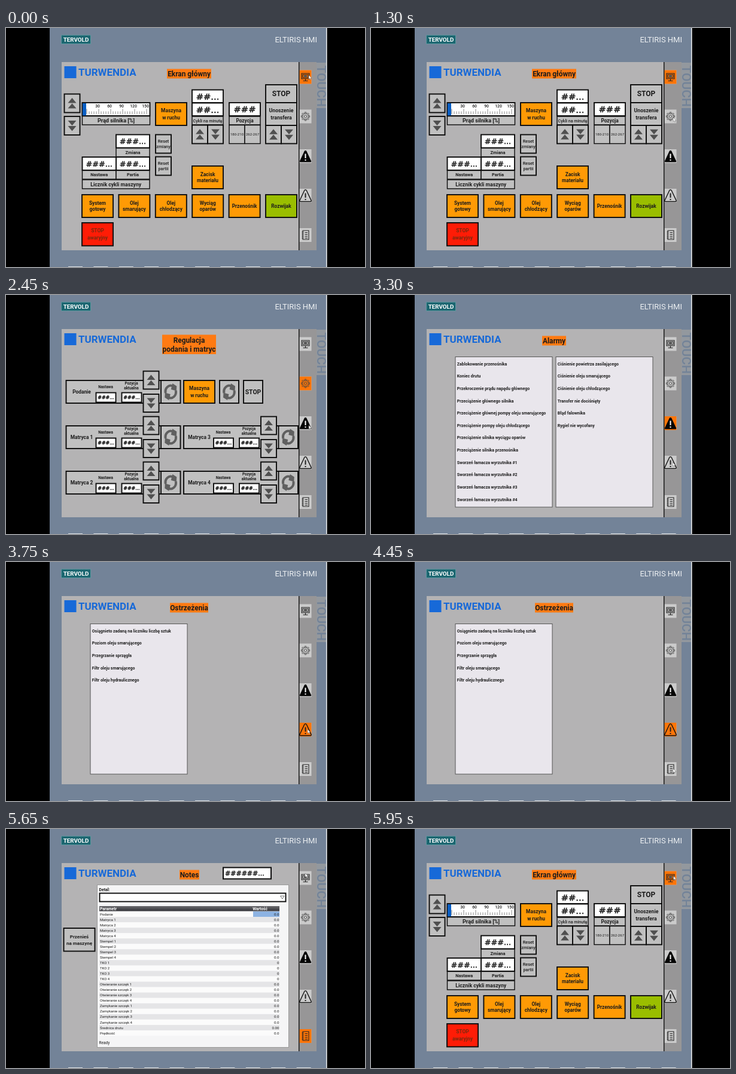
An HTML page that plays this animation: 600x400 px, repeating every 6000 ms.

```html
<!DOCTYPE html>
<html lang="pl">
<head>
<meta charset="utf-8">
<title>Panel operatorski</title>
<style>
  html, body { margin: 0; width: 100%; height: 100%; overflow: hidden; background: #000; }
  svg { display: block; width: 600px; height: 400px; }
  text { font-family: Roboto, "Noto Sans", sans-serif; }
  .hash { font-family: "DejaVu Sans", sans-serif; stroke: #1c1c1c; stroke-width: .5px; }
  .screen { visibility: hidden; animation: 6s step-end infinite; }
  #main { animation-name: main; }
  #feed { animation-name: feed; }
  #alarms { animation-name: alarms; }
  #warnings { animation-name: warnings; }
  #notes { animation-name: notes; }
  #cursor { animation: travel 6s ease-in-out infinite; }
  @keyframes main { 0% { visibility: visible } 25% { visibility: hidden } 95%, 100% { visibility: visible } }
  @keyframes feed { 0% { visibility: hidden } 25% { visibility: visible } 41.66%, 100% { visibility: hidden } }
  @keyframes alarms { 0% { visibility: hidden } 41.66% { visibility: visible } 61.66%, 100% { visibility: hidden } }
  @keyframes warnings { 0% { visibility: hidden } 61.66% { visibility: visible } 75%, 100% { visibility: hidden } }
  @keyframes notes { 0% { visibility: hidden } 75% { visibility: visible } 95%, 100% { visibility: hidden } }
  @keyframes travel {
    0%, 100% { transform: translate(506px, 79px) }
    21%, 25% { transform: translate(505px, 150px) }
    41%, 47.5% { transform: translate(506px, 218px) }
    55%, 65% { transform: translate(504px, 280px) }
    74%, 81.7% { transform: translate(505px, 346px) }
    92%, 96% { transform: translate(500px, 74px) }
  }
</style>
</head>
<body>
<svg id="stage" viewBox="0 0 600 400"></svg>
<script>
const ORANGE = '#ff9a05', TITLE = '#ff7a12', GREY = '#c0c0c0', PANEL = '#b4b3b4', INK = '#1c1c1c', EDGE = '#0c0c0c';

const rect = (x, y, w, h, fill, stroke = 'none', sw = 1.9) =>
  `<rect x="${x}" y="${y}" width="${w}" height="${h}" fill="${fill}" stroke="${stroke}" stroke-width="${sw}"/>`;
const path = (d, attrs) => `<path d="${d}" ${attrs}/>`;
const text = (s, x, y, size, { weight = 700, anchor = 'middle', fill = INK, extra = '' } = {}) =>
  `<text x="${x}" y="${y}" font-size="${size}" font-weight="${weight}" text-anchor="${anchor}" fill="${fill}" ${extra}>${s}</text>`;
const left = (s, x, y, size, weight = 600) => text(s, x, y, size, { weight, anchor: 'start' });
const hashes = (s, x, y, size) => text(s, x, y, size, { weight: 400, extra: 'class="hash"' });

// Lines of text centred on a point
const lines = (s, x, y, size, gap, opts) => {
  const rows = s.split('/');
  return rows.map((row, i) =>
    text(row, x, y + size * .35 + (i - (rows.length - 1) / 2) * gap, size, opts)).join('');
};
const button = (x, y, w, h, label, fill = GREY, size = 8.3, gap = 10.5) =>
  rect(x, y, w, h, fill, EDGE) + lines(label, x + w / 2, y + h / 2, size, gap);
const cell = (x, y, w, h, s, size) =>
  rect(x, y, w, h, '#fff', EDGE) + hashes(s, x + w / 2, y + h / 2 + size * .37, size);
const label = (x, y, w, h, s, size, weight = 600) =>
  rect(x, y, w, h, GREY, EDGE, 1.4) + text(s, x + w / 2, y + h / 2 + size * .36, size, { weight });
const title = (x, w, s) => rect(x, 68.5, w, 16, TITLE) + text(s, x + w / 2, 80.7, 11.9);

const arrows = (x, y, w, h, down) => {
  const tri = 'M0 -9 L7 -.6 H-7 Z M0 .2 L7 8.6 H-7 Z';
  return rect(x, y, w, h, GREY, EDGE) +
    path(tri, `fill="#505050" transform="translate(${x + w / 2} ${y + h / 2}) scale(1 ${down ? -1 : 1})"`);
};
const arrowPair = (x, y, w, h) => arrows(x, y, w, h) + arrows(x + w, y, w, h, true);
const refresh = (x, y, w, h) => {
  const half = path('M-8.5 2 A8.5 10 0 0 1 4 -9', 'fill="none" stroke="#606060" stroke-width="4"') +
    path('M3 -14 L10 -9.5 L9.5 -1.5 L.5 -4 Z', 'fill="#606060"');
  return rect(x, y, w, h, GREY, EDGE) +
    `<g transform="translate(${x + w / 2} ${y + h / 2})">${half}<g transform="rotate(180)">${half}</g></g>`;
};

function mainScreen() {
  let s = title(269, 74, 'Ekran główny');
  s += arrows(97.5, 110.5, 26, 31) + arrows(97.5, 148, 26, 31, true);

  s += rect(127.5, 125, 113, 22, '#fff', EDGE) + rect(128, 126, 6, 20.5, '#0b5fc4');
  for (let i = 0; i <= 25; i++) {
    const x = 135 + i * 4;
    s += path(`M${x} ${i % 5 ? 139.5 : 135.5} V144`, 'stroke="#555" stroke-width=".7"');
  }
  [30, 60, 90, 120, 150].forEach((n, i) => { s += text(n, 153 + i * 20, 132.5, 6.8, { weight: 500 }); });
  s += label(127.5, 147.5, 113, 14.5, 'Prąd silnika [%]', 9.1, 700);

  s += button(250, 125, 52, 38, 'Maszyna/w ruchu', ORANGE, 8.4, 11.5);
  s += cell(311, 103.5, 52, 21.5, '##...', 14.7) + cell(311, 125.5, 52, 21.5, '##...', 14.7);
  s += label(311, 148, 52, 14, 'Cykli na minutę', 7.1, 500) + arrowPair(311, 162.5, 26, 31);
  s += cell(373, 125, 52, 22, '###', 14.7) + label(373, 148, 52, 14, 'Pozycja', 8.3);
  s += label(373, 162.5, 26, 31, '180-210', 6.1, 400) + label(399, 162.5, 26, 31, '262-267', 6.1, 400);
  s += button(434, 95, 52, 30, 'STOP', GREY, 12) + button(434, 125, 52, 38, 'Unoszenie/transfera', GREY, 8.7, 11.5);
  s += arrowPair(434, 163, 26, 30.5);

  s += cell(184, 178.5, 56, 22, '###...', 12.8) + label(184, 201, 56, 14.5, 'Zmiana', 7.4);
  s += cell(127.5, 216, 56.5, 22, '###...', 12.8) + cell(184, 216, 56, 22, '###...', 12.8);
  s += label(127.5, 238.5, 56.5, 14.5, 'Nastawa', 7.4) + label(184, 238.5, 56, 14.5, 'Partia', 7.4);
  s += label(127.5, 254, 112.5, 15, 'Licznik cykli maszyny', 8.7, 700);
  for (const [y, name] of [[178.5, 'zmiany'], [215.5, 'partii']])
    s += rect(250, y, 26, 31, GREY, EDGE) + lines('Reset/' + name, 263, y + 15.5, 7.3, 9.5, { weight: 500 });

  s += button(311, 231, 52, 38, 'Zacisk/materiału', ORANGE, 8.3, 10);
  ['System/gotowy', 'Olej/smarujący', 'Olej/chłodzący', 'Wyciąg/oparów', 'Przenośnik', 'Rozwijak'].forEach((name, i) => {
    s += button(127 + i * 61.4, 279, 52, 38, name, i < 5 ? ORANGE : '#9abe00', 8.3, 10);
  });
  s += rect(127, 326, 52, 38.5, '#ff1c06', EDGE) +
    lines('STOP/awaryjny', 153, 345.5, 8.5, 12, { fill: '#7a2a10' });
  return s;
}

function unit(x, y, name) {
  const small = { weight: 600 };
  return rect(x, y, 163, 38, GREY, EDGE) + text(name, x + 26, y + 22.3, 8.4) +
    text('Nastawa', x + 66, y + 12.5, 6.3, small) +
    lines('Pozycja/aktualna', x + 109, y + 9, 6.3, 7.5, small) +
    cell(x + 50, y + 20.5, 33, 16, '###...', 7.9) + cell(x + 93, y + 20.5, 33, 16, '###...', 7.9) +
    arrows(x + 129, y - 15.5, 26, 30) + arrows(x + 129, y + 23, 26, 30, true) +
    refresh(x + 158.5, y, 32.5, 38);
}

function feedScreen() {
  return rect(261, 66.5, 90, 32.5, TITLE) + lines('Regulacja/podania i matryc', 306, 83.5, 11.9, 15) +
    unit(100.5, 143, 'Podanie') + unit(100.5, 219, 'Matryca 1') + unit(100.5, 295, 'Matryca 2') +
    unit(297, 219, 'Matryca 3') + unit(297, 295, 'Matryca 4') +
    button(297, 143, 52, 38, 'Maszyna/w ruchu', ORANGE, 8.4, 11.5) +
    refresh(357, 143, 32, 38) + button(397, 143, 32, 38, 'STOP', GREY, 10.4);
}

const list = (x, items) => rect(x, 103.5, 162, 251.5, '#e9e6ec', '#555', 1) +
  items.map((item, i) => left(item, x + 2.8, 117.7 + i * 20.62, 6.95)).join('');

function alarmScreen() {
  return title(286, 40, 'Alarmy') + list(141, [
    'Zablokowanie przenośnika', 'Koniec drutu', 'Przekroczenie prądu napędu głównego',
    'Przeciążenie głównego silnika', 'Przeciążenie głównej pompy oleju smarującego',
    'Przeciążenie pompy oleju chłodzącego', 'Przeciążenie silnika wyciągu oparów',
    'Przeciążenie silnika przenośnika',
    ...[1, 2, 3, 4].map(n => 'Sworzeń łamacza wyrzutnika #' + n)
  ]) + list(309, [
    'Ciśnienie powietrza zasilającego', 'Ciśnienie oleju smarującego', 'Ciśnienie oleju chłodzącego',
    'Transfer nie dociśnięty', 'Błąd falownika', 'Rygiel nie wycofany'
  ]);
}

function warningScreen() {
  return title(274, 64, 'Ostrzeżenia') + list(141, [
    'Osiągnieto zadaną na liczniku liczbę sztuk', 'Poziom oleju smarującego', 'Przegrzanie sprzęgła',
    'Filtr oleju smarującego', 'Filtr oleju hydraulicznego'
  ]);
}

function notesScreen() {
  const four = name => [1, 2, 3, 4].map(n => `${name} ${n}`);
  const rows = ['Podanie', ...four('Matryca'), ...four('Stempel'), ...four('TKO'),
    ...four('Otwieranie szczęk'), ...four('Zamykanie szczęk'), 'Średnica drutu', 'Prędkość'];
  const step = 9.045, white = { fill: '#fff' };
  let s = title(290, 33, 'Notes') + rect(363, 64.5, 80, 19, '#fff', EDGE, 2) +
    text('######...', 366, 78, 11, { weight: 400, anchor: 'start', extra: 'class="hash"' });
  s += button(96.5, 166, 52, 38.5, 'Przenieś/na maszynę', GREY, 8, 11);
  s += rect(152.5, 93.5, 320, 272, '#f5f5f6', '#999', 1) + left('Detal:', 155.5, 103.5, 6.9);
  s += rect(156.5, 107.5, 311, 14, '#fff', EDGE) +
    path('M458.5 112 H465 L461.8 117 Z', 'fill="none" stroke="#555" stroke-width=".8"');
  s += rect(156, 129, 301, 8.5, 'url(#head)') +
    text('Parametr', 157, 135.5, 6.7, { anchor: 'start', ...white }) +
    text('Wartość', 437, 135.5, 6.7, { anchor: 'end', ...white });
  rows.forEach((name, i) => {
    const y = 138 + i * step;
    const value = name.startsWith('TKO') ? '0' : name.startsWith('Śr') ? '0.00' : '0.0';
    s += rect(156, y, 301, step, i % 2 ? '#e5e5e7' : '#fbfbfb');
    if (!i) s += rect(413, y, 44, step, '#8db3e2');
    s += left(name, 157, y + 6.6, 6, 400) + text(value, 456.5, y + 6.6, 6.2, { weight: 400, anchor: 'end' });
  });
  return s + left('Ready', 155.5, 359.5, 6.5, 400);
}

const iconY = [82, 148, 214.5, 280.5, 346.5];
const iconBox = (i, fill) => rect(490.5, iconY[i] - 11.5, 20, 23, fill);

function icons() {
  const line = 'fill="none" stroke="#222" stroke-width="1.1"';
  const tri = 'M0 -9.5 Q1 -10 1.8 -8.5 L9.5 8 Q10 10 8.5 10 H-8.5 Q-10 10 -9.5 8 L-1.8 -8.5 Q-1 -10 0 -9.5 Z';
  const mark = color => path('M0 -4 V3.5 M0 5.5 V7.5', `stroke="${color}" stroke-width="2"`);
  let teeth = '';
  for (let a = 0; a < 360; a += 45)
    teeth += path('M-1.3 -4.6 V-7 H1.3 V-4.6', `fill="none" stroke="#444" stroke-width=".9" transform="rotate(${a})"`);
  const marks = [
    path('M-6.5 -6 H6.5 V3 H-6.5 Z M-4.5 -4 H4.5 V1 H-4.5 Z M0 3 V6 M-4 6.5 H4', line) + rect(-2.5, -3, 5, 3, '#555'),
    teeth + '<g fill="none" stroke="#444" stroke-width=".9"><circle r="4.8"/><circle r="2.2"/></g>',
    path(tri, 'fill="#050505"') + mark('#fff'),
    path(tri, 'fill="none" stroke="#111" stroke-width="1.4"') + mark('#222'),
    path('M-4.5 -7.5 H5.5 V7.5 H-4.5 Z M-6 -5 H-3 M-6 -1.7 H-3 M-6 1.7 H-3 M-6 5 H-3 M-1 -4 H3.5 M-1 -1 H3.5 M-1 2 H3.5 M-1 5 H3.5', line)
  ];
  return marks.map((m, i) => `<g transform="translate(500.5 ${iconY[i]})">${m}</g>`).join('');
}

function frame() {
  let s = rect(73, 0, 463, 400, '#738398') + rect(535, 0, 1.6, 400, '#e9edf0');
  for (let i = 0; i < 10; i++) s += rect(104 + i * 42.4, 399, 24, 1, '#dfe4e8');
  s += rect(92.5, 12, 49, 14.5, '#1b6670', '#5f98a0', 1) + text('TERVOLD', 117, 22.8, 9.8, { fill: '#fff' });
  s += text('ELTIRIS HMI', 520, 23.6, 13, { weight: 400, anchor: 'end', fill: '#edf0f3' });
  s += rect(519, 58, 16, 76, '#93989e') +
    text('TOUCH', 0, 0, 21, { weight: 500, anchor: 'start', fill: '#738398', extra: 'transform="translate(519.5 62.5) rotate(90)"' });
  s += rect(93, 57, 426, 315, PANEL);
  return s;
}

const brand = rect(97.5, 64, 20, 20, '#1769d8') +
  text('TURWENDIA', 121, 80, 17, { anchor: 'start', fill: '#1769d8' });

const screens = [
  ['main', mainScreen], ['feed', feedScreen], ['alarms', alarmScreen],
  ['warnings', warningScreen], ['notes', notesScreen]
];
const layers = screens.map(([id, draw], i) =>
  `<g id="${id}" class="screen">${draw()}${iconBox(i, '#ff7508')}</g>`).join('');

document.getElementById('stage').innerHTML =
  '<defs><linearGradient id="head" x2="0" y2="1"><stop stop-color="#6a6a6e"/><stop offset="1" stop-color="#333338"/></linearGradient></defs>' +
  frame() + rect(490, 57, 29, 315, '#979697') + iconY.map((_, i) => iconBox(i, '#cbcbcb')).join('') +
  layers + rect(489, 57, 1.4, 315, '#111') + brand + icons() +
  path('M0 0 V6.5 L1.6 5.2 L2.7 7.5 L3.8 7 L2.8 4.8 H4.8 Z', 'id="cursor" fill="#fff" stroke="#444" stroke-width=".4"');
</script>
</body>
</html>
```
